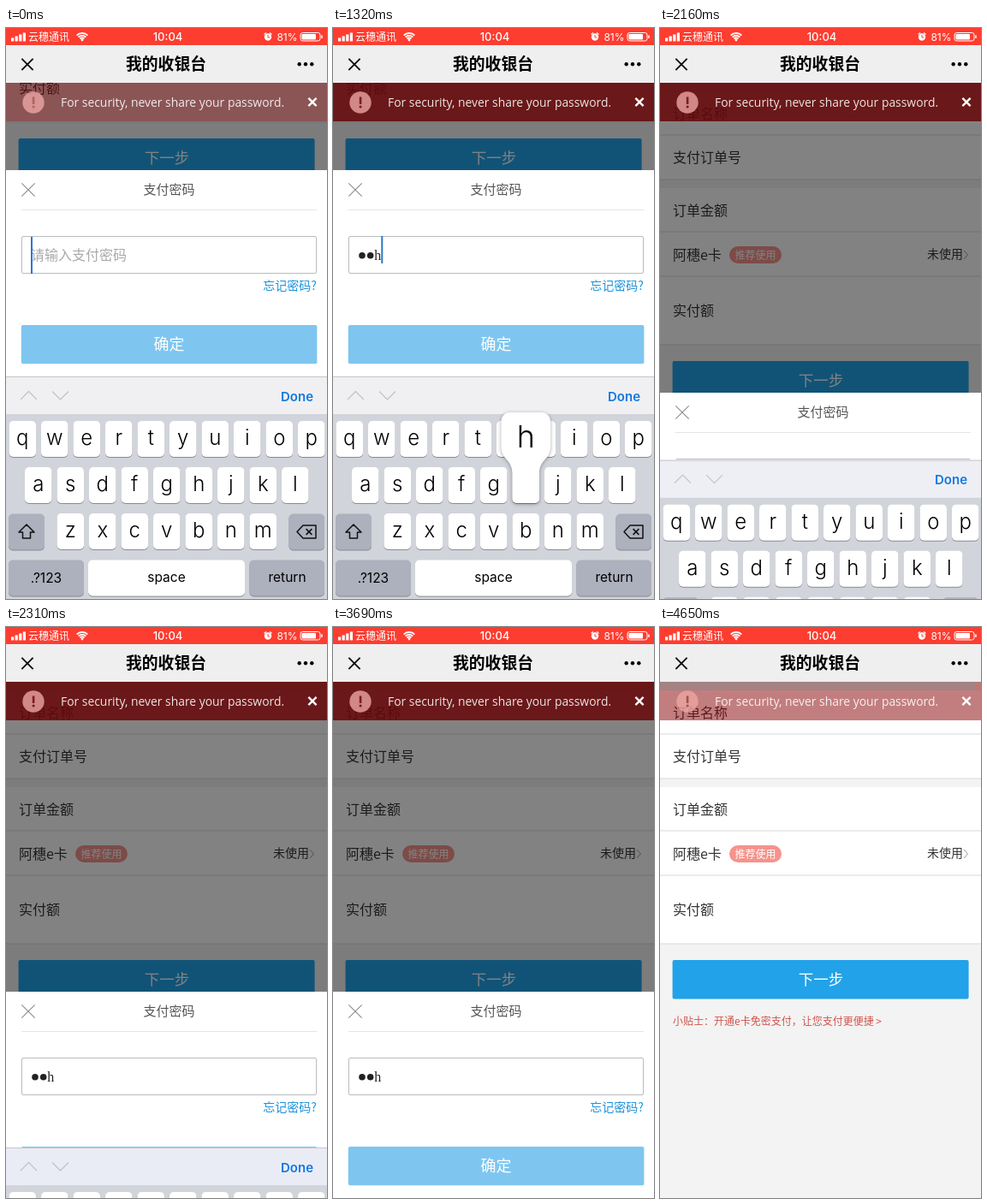
An HTML page with a canvas that plays this animation: 375 px wide and 667 px high, repeating every 4680 ms.

```html
<!DOCTYPE html>
<html lang="zh-CN">
<head>
<meta charset="utf-8">
<style>
  html, body { margin: 0; width: 100%; height: 100%; overflow: hidden; background: #f3f3f3; }
  canvas { display: block; width: 375px; height: 667px; }
</style>
</head>
<body>
<canvas id="stage"></canvas>
<script>
const W = 375, H = 667, LOOP = 4680;
const CJK = '"Noto Sans CJK SC", "Noto Sans CJK", sans-serif';
const UI = 'Inter, "Noto Sans CJK SC", sans-serif';
const BLUE = '#1c93dc';

const KEY_ROWS = [
  { keys: 'qwertyuiop', x: 3.5, y: 52 },
  { keys: 'asdfghjkl', x: 22, y: 106 },
  { keys: 'zxcvbnm', x: 59.5, y: 160 }
];
const PRESSES = [
  { key: 'g', from: 660, to: 780 },
  { key: 'h', from: 960, to: 1080 },
  { key: 'h', from: 1260, to: 1380 }
];
const DISMISS = 2032, SCROLL_BACK = 2160, CLOSE_SHEET = 4320, FADE_OUT = 4530;

const canvas = document.getElementById('stage');
const ctx = canvas.getContext('2d');
const ratio = window.devicePixelRatio || 1;
canvas.width = W * ratio;
canvas.height = H * ratio;

const clamp = v => Math.max(0, Math.min(1, v));
const lerp = (a, b, p) => a + (b - a) * p;

function rect(x, y, w, h, color) {
  ctx.fillStyle = color;
  ctx.fillRect(x, y, w, h);
}

function round(x, y, w, h, r, color) {
  ctx.fillStyle = color;
  ctx.beginPath();
  ctx.roundRect(x, y, w, h, r);
  ctx.fill();
}

function disc(x, y, r, color) {
  ctx.fillStyle = color;
  ctx.beginPath();
  ctx.arc(x, y, r, 0, Math.PI * 2);
  ctx.fill();
}

function line(points, color, width = 1, close = false) {
  ctx.strokeStyle = color;
  ctx.lineWidth = width;
  ctx.beginPath();
  points.forEach(([x, y], i) => i ? ctx.lineTo(x, y) : ctx.moveTo(x, y));
  if (close) ctx.closePath();
  ctx.stroke();
}

function cross(x, y, r, color, width) {
  line([[x - r, y - r], [x + r, y + r]], color, width);
  line([[x + r, y - r], [x - r, y + r]], color, width);
}

function text(str, x, y, size, color, { align = 'left', family = CJK, weight = 400, base = 'middle' } = {}) {
  ctx.font = `${weight} ${size}px ${family}`;
  ctx.textAlign = align;
  ctx.textBaseline = base;
  ctx.fillStyle = color;
  ctx.fillText(str, x, y);
}

function drawPage(top) {
  ctx.save();
  ctx.translate(0, top);
  rect(0, -260, W, H + 520, '#f3f3f3');
  rect(0, 74, W, 103, '#fff');
  rect(0, 187, W, 183, '#fff');
  for (const y of [125, 177, 238, 290, 370]) rect(0, y - 0.5, W, 1, '#d9d9d9');

  const labels = [['订单名称', 100], ['支付订单号', 151], ['订单金额', 213], ['阿穗e卡', 264.5], ['实付额', 330]];
  for (const [label, y] of labels) text(label, 15, y, 16, '#333');

  round(81, 255, 61, 20, 10, '#f5938c');
  text('推荐使用', 111.5, 265, 12, '#fff', { align: 'center' });
  text('未使用', 354, 264, 14, '#333', { align: 'right' });
  line([[355, 260], [359.5, 265], [355, 270]], '#999');

  round(14.6, 389, 346, 45.4, 2, '#22a2e8');
  text('下一步', 188, 411, 17.5, '#fff', { align: 'center' });
  text('小贴士：开通e卡免密支付，让您支付更便捷 >', 15, 460, 12, '#d0534c');
  ctx.restore();
}

function drawBanner(level) {
  const red = Math.round(lerp(190, 103, level));
  rect(0, 64, W, 45, `rgba(${red},7,9,${0.86 * level})`);
  ctx.save();
  ctx.globalAlpha = 0.8;
  disc(32, 87, 12.7, '#eba5a3');
  ctx.globalAlpha = level;
  rect(30.8, 80.5, 2.6, 8.5, '#7d1d20');
  disc(32.1, 92, 1.6, '#7d1d20');
  ctx.globalAlpha = 0.88;
  text('For security, never share your password.', 64, 92, 13.9, '#fff',
    { family: '"Open Sans", "Noto Sans", sans-serif', base: 'alphabetic' });
  ctx.globalAlpha = 0.95;
  cross(358, 86.5, 4.6, '#fff', 2.5);
  ctx.restore();
}

function caretAlpha(t) {
  if (t >= DISMISS) return 0;
  const start = t < PRESSES[0].from ? 0 : 1400;
  const p = t - start;
  if (p < 300 || (t >= PRESSES[0].from && t < start)) return 1;
  return p < 600 ? 1 - clamp((p - 300) / 200) : clamp((p - 600) / 150);
}

function drawSheet(top, t) {
  ctx.save();
  ctx.translate(0, top);
  rect(0, 0, W, H, '#fff');
  cross(26, 23, 7.7, '#8b8b8b', 1.1);
  text('支付密码', 190.5, 22.5, 15, '#555', { align: 'center' });
  rect(18, 46, 345, 1, '#e5e5e5');

  ctx.strokeStyle = '#b8bcc0';
  ctx.lineWidth = 1;
  ctx.beginPath();
  ctx.roundRect(18.5, 77.5, 344, 43, 1.5);
  ctx.stroke();

  const typed = PRESSES.filter(p => t >= p.from);
  if (typed.length) {
    const hidden = typed.length - 1;
    for (let i = 0; i < hidden; i++) disc(34 + i * 9.7, 99.7, 3.8, '#222');
    text(typed[hidden].key, 29.3 + hidden * 9.5, 105, 16, '#222',
      { family: '"Liberation Serif", serif', base: 'alphabetic' });
  } else {
    text('请输入支付密码', 29, 99, 16, '#a9a9a9');
  }

  ctx.globalAlpha = caretAlpha(t);
  if (typed.length) rect(29 + typed.length * 9.1, 77, 2, 32, '#2a78c4');
  else rect(29, 78, 2, 43, '#2f74d0');
  ctx.globalAlpha = 1;

  text('忘记密码?', 363, 135, 14, BLUE, { align: 'right' });
  round(17.8, 181, 345.6, 45.3, 2, '#7ec6f0');
  text('确定', 190.5, 203, 18, '#fff', { align: 'center' });
  ctx.restore();
}

function drawKey(x, y, w, color) {
  round(x, y + 1, w, 42, 5, '#888b91');
  round(x, y, w, 42, 5, color);
}

function drawPopup(key) {
  const row = KEY_ROWS.find(r => r.keys.includes(key));
  const x = row.x + row.keys.indexOf(key) * 37.5, y = row.y;
  const left = x - 13, right = x + 44.5, top = y - 64;
  ctx.save();
  ctx.shadowColor = 'rgba(0,0,0,.35)';
  ctx.shadowBlur = 4 * ratio;
  ctx.shadowOffsetY = ratio;
  ctx.fillStyle = '#fff';
  ctx.beginPath();
  ctx.moveTo(left + 10, top);
  ctx.arcTo(right, top, right, top + 40, 10);
  ctx.lineTo(right, top + 40);
  ctx.bezierCurveTo(right, top + 56, x + 31.5, y - 10, x + 31.5, y + 8);
  ctx.arcTo(x + 31.5, y + 42, x, y + 42, 5);
  ctx.arcTo(x, y + 42, x, y, 5);
  ctx.lineTo(x, y + 8);
  ctx.bezierCurveTo(x, y - 10, left, top + 56, left, top + 40);
  ctx.arcTo(left, top, left + 10, top, 10);
  ctx.fill();
  ctx.restore();
  text(key, x + 15.75, y - 23, 36, '#000', { align: 'center', family: UI, weight: 300, base: 'alphabetic' });
}

function drawShift(x, y) {
  line([[x, y - 9], [x + 9, y], [x + 4.5, y], [x + 4.5, y + 7],
    [x - 4.5, y + 7], [x - 4.5, y], [x - 9, y]], '#111', 1.5, true);
}

function drawDelete(x, y) {
  line([[x - 11, y], [x - 4, y - 7.5], [x + 11, y - 7.5], [x + 11, y + 7.5], [x - 4, y + 7.5]], '#111', 1.5, true);
  cross(x + 3, y, 3.4, '#111', 1.5);
}

function drawKeyboard(down, t) {
  const grey = '#adb0bd';
  ctx.save();
  ctx.lineJoin = 'round';
  ctx.translate(0, 407 + 260 * down);
  rect(0, 0, W, 44, '#f0f0f2');
  rect(0, 0, W, 44, `rgba(233,236,246,${down})`);
  rect(0, 0, W, 1, '#c3c5c9');
  rect(0, 44, W, 260, '#d1d4da');
  line([[17, 27], [26.5, 17.5], [36, 27]], '#c2c4c8', 1.3);
  line([[54, 17.5], [63.5, 27], [73, 17.5]], '#c2c4c8', 1.3);
  text('Done', 359, 28.5, 15, '#1479e0', { align: 'right', family: UI, weight: 600, base: 'alphabetic' });

  const label = { align: 'center', family: UI, base: 'alphabetic' };
  for (const row of KEY_ROWS) {
    [...row.keys].forEach((key, i) => {
      const x = row.x + i * 37.5;
      drawKey(x, row.y, 31.5, '#fff');
      text(key, x + 15.75, row.y + 28, 24, '#000', { ...label, weight: 300 });
    });
  }
  drawKey(3, 160.5, 42, grey);
  drawKey(330.5, 160.5, 41.5, grey);
  drawShift(24, 182);
  drawDelete(351, 181.5);

  drawKey(3, 214.5, 88, grey);
  drawKey(96, 214.5, 183, '#fff');
  drawKey(284.5, 214.5, 87.5, grey);
  text('.?123', 47, 241, 15.5, '#000', label);
  text('space', 187.5, 240, 15.5, '#000', label);
  text('return', 328.5, 240, 15.5, '#000', label);

  const press = PRESSES.find(p => t >= p.from && t < p.to);
  if (press) drawPopup(press.key);
  ctx.restore();
}

function drawHeader() {
  rect(0, 0, W, 20, '#fc3d30');
  for (let i = 0; i < 4; i++) rect(6 + i * 4.6, 11.5 - i * 2, 3.2, 4 + i * 2, '#fff');
  text('云穗通讯', 26, 10, 12, '#fff');
  for (const r of [3.5, 6.2, 9]) {
    ctx.strokeStyle = '#fff';
    ctx.lineWidth = 1.8;
    ctx.beginPath();
    ctx.arc(89, 15, r, -Math.PI * 0.75, -Math.PI * 0.25);
    ctx.stroke();
  }
  disc(89, 14, 1.4, '#fff');
  text('10:04', 189, 14.7, 13, '#fff', { align: 'center', family: UI, weight: 500, base: 'alphabetic' });

  disc(306, 10.5, 4.2, '#fff');
  line([[306, 8], [306, 11], [308.2, 11]], '#fc3d30', 1);
  line([[301.5, 7.5], [304, 5.5]], '#fff', 1.3);
  line([[308, 5.5], [310.5, 7.5]], '#fff', 1.3);
  text('81%', 340.5, 14.5, 12, '#fff', { align: 'right', family: UI, base: 'alphabetic' });
  ctx.strokeStyle = '#fff';
  ctx.lineWidth = 1;
  ctx.beginPath();
  ctx.roundRect(344, 5.5, 23, 9.5, 2.5);
  ctx.stroke();
  round(345.5, 7, 16.5, 6.5, 1, '#fff');
  rect(368.3, 8.5, 1.4, 3.5, '#fff');

  rect(0, 20, W, 44, '#efeff0');
  cross(25, 42.5, 6.6, '#000', 1.8);
  text('我的收银台', 187, 42, 18.8, '#000', { align: 'center', weight: 700 });
  for (const x of [342.7, 350, 357.3]) disc(x, 42.3, 2.2, '#000');
}

const fadeOut = t => clamp((t - FADE_OUT) / 120);

function bannerLevel(t) {
  const fadeIn = 1 - (1 - clamp(t / 540)) ** 2;
  return 0.42 + 0.58 * fadeIn - 0.4 * fadeOut(t);
}

// Critically damped spring for the keyboard leaving the screen.
function keyboardDown(t) {
  const s = Math.max(0, t - DISMISS) * 0.01013;
  return 1 - (1 + s) * Math.exp(-s);
}

function draw(t) {
  ctx.setTransform(ratio, 0, 0, ratio, 0, 0);
  drawPage(t < SCROLL_BACK ? -260 : 0);
  const open = t < CLOSE_SHEET;
  if (open) rect(0, 64, W, H, 'rgba(0,0,0,.49)');
  drawBanner(bannerLevel(t));
  if (!open) rect(0, 64, 368, 10, `rgba(165,130,131,${fadeOut(t)})`);
  if (open) drawSheet(t < DISMISS ? 166 : 426, t);
  if (t < 3060) drawKeyboard(keyboardDown(t), t);
  drawHeader();
}

function tick() {
  draw(performance.now() % LOOP);
  requestAnimationFrame(tick);
}
tick();
</script>
</body>
</html>
```
